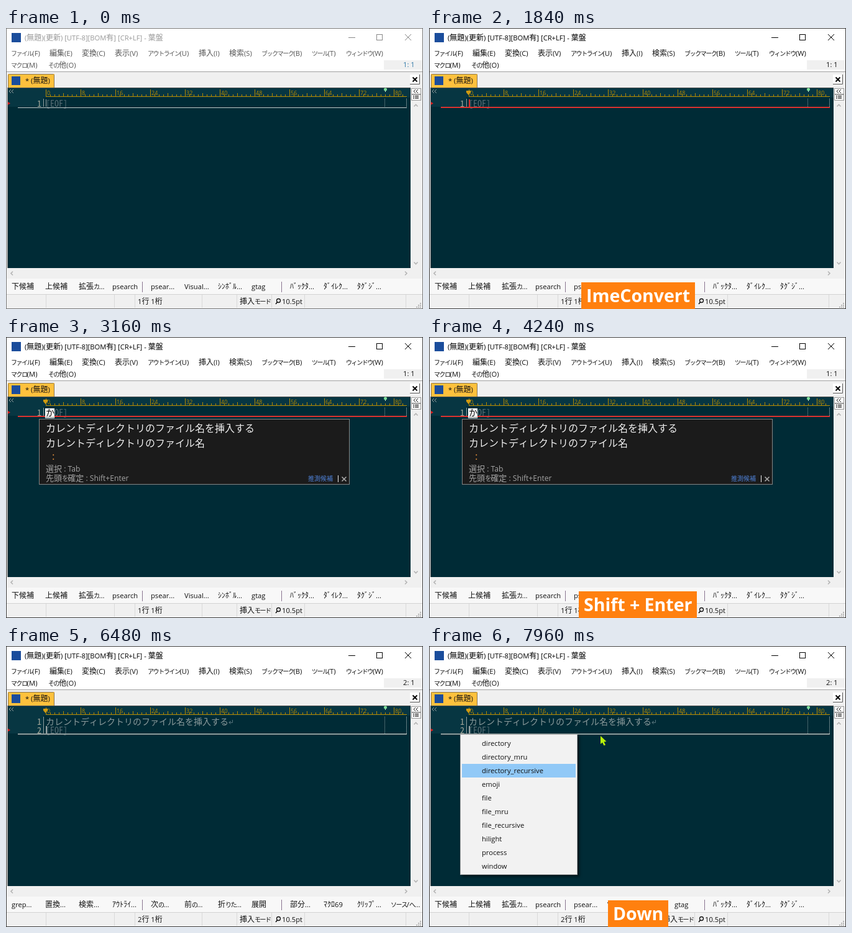
Write an HTML page with a canvas that moves like this. It is 671 px wide and 453 px high and loops after 8 s.

```html
<!DOCTYPE html>
<html lang="ja">
<head>
<meta charset="utf-8">
<title>Editor</title>
<style>
html, body { margin: 0; width: 100%; height: 100%; overflow: hidden; background: #fff; }
canvas { display: block; }
</style>
</head>
<body>
<canvas id="stage" width="671" height="453"></canvas>
<script>
const ctx = document.getElementById('stage').getContext('2d');
const LOOP = 8000;
const UI = '"Open Sans", "Noto Sans CJK JP", "Noto Sans CJK", sans-serif';
const CJK = '"Noto Sans CJK JP", "Noto Sans CJK", sans-serif';
const MONO = '"Noto Sans Mono CJK JP", "Noto Sans CJK JP", "Noto Sans Mono", monospace';
const BASE = '#002b36', PANEL = '#073642', GOLD = '#b58900', RED = '#dc322f';
const CELL = 7, LEFT = 64;

const SENTENCE = 'カレントディレクトリのファイル名を挿入する';
const MENU = [['ファイル(F)', 8], ['編集(E)', 70], ['変換(C)', 122], ['表示(V)', 175],
  ['アウトライン(U)', 228], ['挿入(I)', 310], ['検索(S)', 359], ['ブックマーク(B)', 411],
  ['ツール(T)', 492], ['ウィンドウ(W)', 547]];
const KEYS = ['下候補', '上候補', '拡張カ...', 'psearch', 'psear...', 'Visual...',
  'ｼﾝﾎﾞﾙ...', 'gtag', 'ﾊﾞｯｸﾀ...', 'ﾀﾞｲﾚｸ...', 'ﾀｸﾞｼﾞ...'];
const CTRL_KEYS = ['grep...', '置換...', '検索...', 'ｱｳﾄﾗｲ...', '次の...', '前の...',
  '折りた...', '展開', '部分...', 'ﾏｸﾛ69', 'ｸﾘｯﾌﾟ...', 'ソース/ヘ...'];
const SOURCES = ['directory', 'directory_mru', 'directory_recursive', 'emoji', 'file',
  'file_mru', 'file_recursive', 'hilight', 'process', 'window'];

// [start time, banner text]
const BANNERS = [[0, ''], [1840, 'ImeConvert'], [2240, 'ImeConvert  k'], [2320, 'ImeConvert  k  a'],
  [2720, 'k  a'], [3160, ''], [4240, 'Shift + Enter'], [5120, ''], [5160, 'Enter'],
  [5560, 'Enter  ImeNonConvert'], [6080, 'ImeNonConvert'], [6480, ''],
  [6640, 'Ctrl + P'], [7200, 'Ctrl + P  Down'], [7520, 'Down']];

const within = (t, a, b) => t >= a && t < b;

function box(x, y, w, h, color) {
  ctx.fillStyle = color;
  ctx.fillRect(x, y, w, h);
}

function frame(x, y, w, h, color) {
  ctx.strokeStyle = color;
  ctx.lineWidth = 1;
  ctx.strokeRect(x + .5, y + .5, w - 1, h - 1);
}

function path(points, color, width = 1) {
  ctx.beginPath();
  points.forEach(([x, y], i) => i ? ctx.lineTo(x, y) : ctx.moveTo(x, y));
  ctx.strokeStyle = color;
  ctx.lineWidth = width;
  ctx.stroke();
}

function poly(points, color) {
  ctx.beginPath();
  points.forEach(([x, y]) => ctx.lineTo(x, y));
  ctx.closePath();
  ctx.fillStyle = color;
  ctx.fill();
}

function cross(x, y, r, color, width) {
  path([[x - r, y - r], [x + r, y + r]], color, width);
  path([[x + r, y - r], [x - r, y + r]], color, width);
}

function chevron(x, y, dx, dy, color, width = 1.6) {
  path([[x - dx - dy * 2, y - dy - dx * 2], [x + dx, y + dy], [x - dx + dy * 2, y - dy + dx * 2]], color, width);
}

function text(s, x, y, color, font) {
  ctx.font = font;
  ctx.fillStyle = color;
  ctx.fillText(s, x, y);
}

// Interface text: narrow kana, full kanji, slightly smaller Latin.
function label(s, x, y, color = '#111', size = 12) {
  for (const run of s.match(/[ぁ-ヺー]+|[ -~]+|[^ -~ぁ-ヺー]+/g) || []) {
    const kana = /[ぁ-ヺー]/.test(run), latin = /[ -~]/.test(run);
    ctx.letterSpacing = kana ? -size * .117 + 'px' : '0px';
    text(run, x, y, color, size * (kana ? .833 : latin ? .933 : 1) + 'px ' + (latin ? UI : CJK));
    x += ctx.measureText(run).width;
  }
  ctx.letterSpacing = '0px';
}

// Editor text on a fixed grid.
function cells(s, x, y, color, weight = 400) {
  for (const c of s) {
    text(c, x, y, color, `${weight} 14px ${MONO}`);
    x += c > '~' ? CELL * 2 : CELL;
  }
}

function drawWindow(s) {
  box(0, 0, 671, 453, '#fff');
  box(9, 8, 15, 15, '#1b4d9c');
  label('(無題)(更新) [UTF-8][BOM有] [CR+LF] - 葉盤', 30, 20, s.active ? '#000' : '#999');
  const ink = s.active ? '#000' : '#888';
  box(551, 15, 11, 1, ink);
  frame(596, 10, 10, 10, ink);
  cross(647, 15, 5, ink, 1);
  for (const [name, x] of MENU) label(name, x, 45, s.active ? '#111' : '#555');
  label('マクロ(M)', 8, 64, s.active ? '#111' : '#555');
  label('その他(O)', 68, 64, s.active ? '#111' : '#555');
  box(608, 52, 62, 15, '#f0f0f0');
  label(`${s.row}: ${s.col}`, 639, 63, s.active ? '#111' : '#2f78a8');

  box(1, 70, 669, 382, '#f0f0f0');
  box(1, 70, 669, 1, '#a0a0a0');
  box(3, 74, 75, 22, '#ffc13d');
  path([[3.5, 96], [3.5, 76], [5.5, 74.5], [76, 74.5], [77.5, 76], [77.5, 96]], '#8a7650');
  box(9, 78, 14, 14, '#1b4d9c');
  label('* (無題)', 31, 89);
  box(650, 75, 16, 16, '#fff');
  path([[650, 90.5], [665.5, 90.5], [665.5, 75]], '#555');
  cross(658, 83, 3.5, '#000', 2);

  box(652, 97, 16, 10, '#fff');
  box(652, 107, 16, 10, '#fff');
  frame(652, 97, 16, 10, '#999');
  frame(652, 107, 16, 10, '#999');
  for (const x of [656, 660]) path([[x + 3, 99], [x, 102], [x + 3, 105]], '#222');
  for (const y of [109, 111, 113]) {
    box(655, y, 2, 1, '#222');
    box(658, y, 6, 1, '#222');
  }
  chevron(659.5, 125, 0, -1.5, '#b4b4b4');
  chevron(659.5, 379, 0, 1.5, '#b4b4b4');
  chevron(9.5, 395.5, -1.5, 0, '#b4b4b4');
  chevron(643.5, 395.5, 1.5, 0, '#b4b4b4');

  box(1, 404, 669, 25, '#f8f8f8');
  s.keys.forEach((name, i) => label(name, 9 + i * 54 + (i >> 2) * 8, 421));
  box(219, 409, 1, 17, '#8a7590');
  box(443, 409, 1, 17, '#8a7590');

  box(1, 429, 669, 1, '#d2d2d2');
  for (const x of [64, 174, 207, 315, 371, 427, 480, 643]) box(x, 430, 1, 21, '#d9d9d9');
  label(`${s.row}行 ${s.col}桁`, 212, 445);
  label('挿入モード', 376, 445);
  ctx.beginPath();
  ctx.arc(438.5, 439.5, 3, 0, 7);
  ctx.strokeStyle = '#111';
  ctx.lineWidth = 1.3;
  ctx.stroke();
  path([[436.5, 442], [434, 445]], '#111', 1.6);
  label('10.5pt', 444, 445);
  for (let i = 0; i < 3; i++)
    for (let j = 0; j <= i; j++) box(666 - j * 3, 443 + i * 3, 2, 2, '#b5b5b5');
  frame(0, 0, 671, 453, s.active ? '#3c3c3c' : '#777');
}

function drawRuler(s) {
  box(3, 97, 648, 15, PANEL);
  for (const x of [5, 9]) path([[x + 3, 99], [x, 102], [x + 3, 105]], '#93a1a1');
  for (let i = 0; i <= 82; i++) {
    const x = LEFT + i * CELL, h = i % 8 ? i % 4 ? 3 : 5 : 11;
    box(x, 110 - h, 1, h, GOLD);
    if (i % 8 === 0) text(i, x + 2, 108, GOLD, '9px ' + UI);
  }
  box(LEFT, 110, 581, 1, GOLD);
  if (s.active) {
    const x = LEFT + (s.col - 1) * CELL - .5;
    poly([[x - 3.5, 101], [x + 3.5, 101], [x + 3.5, 104], [x, 108], [x - 3.5, 104]], '#d09a10');
  }
  ctx.beginPath();
  ctx.arc(610.5, 99, 2.5, 0, 7);
  ctx.fillStyle = '#7fe09a';
  ctx.fill();
  box(610, 101, 1, 2, '#d8f5de');
}

function drawEditor(s) {
  box(2, 96, 649, 291, BASE);
  box(2, 96, 649, 1, '#555');
  box(2, 96, 1, 291, '#777');
  drawRuler(s);
  const base = 127 + (s.row - 1) * 14, line = base + (s.active ? 0 : 1);
  box(3, 112, 57, base - 112, PANEL);
  for (let r = 1; r <= s.row; r++) cells(String(r), 50, 113 + r * 14, '#a4a79a');
  box(60, 114, 1, base - 114, '#93a1a1');
  for (let y = 114; y < base; y += 2) {
    box(609, y, 1, 1, '#8a9a9b');
    box(644, y, 1, 1, '#c5cccc');
  }
  poly([[3, base - 8], [7, base - 5.5], [3, base - 3]], '#e02020');

  if (s.typed) cells(SENTENCE, LEFT, 127, '#8b9a9b', 500);
  if (s.row > 1) path([[364.5, 119], [364.5, 123.5], [359, 123.5], [361.5, 121], [359, 123.5], [361.5, 126]], '#53727a');
  const x = LEFT + (s.col - 1) * CELL;
  cells('[EOF]', x, base, '#586e75');
  box(19, line, 626, s.active ? 2 : 1, s.ime ? RED : s.active ? '#8f9b9b' : '#c4c9c9');
  if (!s.compose) box(x, base - 12, s.active ? 2 : 1, 12, s.ime ? RED : '#9aa5a6');

  if (s.compose) {
    box(63, 115, 15, 16, '#fff');
    if (s.caret) box(78, 115, 2, 16, '#fff');
    cells(s.compose, LEFT, 127, '#000');
    for (let i = 64; i < 78; i += 2) box(i, 129, 1, 1, '#000');
  }
}

function drawCandidates() {
  box(53, 132, 500, 106, '#1b1b1b');
  frame(53, 132, 500, 106, '#858585');
  const font = '300 16px ' + CJK;
  text(SENTENCE, 64, 153, '#eee', font);
  text(SENTENCE.slice(0, 16), 64, 177, '#eee', font);
  text(':', 74, 198, '#d98a3a', '16px ' + CJK);
  label('選択 : Tab', 64, 217, '#a5a5a5', 13);
  label('先頭を確定 : Shift+Enter', 64, 232, '#a5a5a5', 13);
  label('推測候補', 486, 232, '#4f82d8', 10);
  box(534, 223, 1, 11, '#eee');
  cross(544, 229, 3.5, '#aaa', 1.6);
}

function drawMenu(selected) {
  ctx.save();
  ctx.shadowColor = 'rgba(0,0,0,.5)';
  ctx.shadowBlur = 4;
  ctx.shadowOffsetX = ctx.shadowOffsetY = 3;
  box(50, 142, 189, 227, '#f2f2f2');
  ctx.restore();
  frame(50, 142, 189, 227, '#a8a8a8');
  if (selected >= 0) box(53, 146 + selected * 22, 183, 22, '#91c9f7');
  SOURCES.forEach((name, i) => label(name, 85, 161 + i * 22));
}

function drawPointer(x, y) {
  const shape = [[0, 0], [0, 13], [3, 10.5], [5.5, 15.5], [8, 14.5], [5.5, 9.5], [9.5, 9]];
  poly(shape.map(([a, b]) => [x + a, y + b]), '#b9f20a');
}

function drawBanner(s) {
  if (!s) return;
  ctx.font = 'bold 28.5px "Open Sans", "Noto Sans", sans-serif';
  const w = ctx.measureText(s).width, x = Math.round(336.5 - w / 2);
  const top = s.includes('Ctrl') ? 406 : 410;
  box(x - 8, top, Math.round(w) + 16, 453 - top, '#ff800f');
  ctx.fillStyle = '#fff';
  ctx.fillText(s, x, 442);
}

function stateAt(t) {
  const typed = t >= 4280, row = t >= 5160 ? 2 : 1;
  return {
    active: t >= 640,
    ime: within(t, 1840, 5560),
    typed, row,
    col: typed && row === 1 ? 43 : 1,
    compose: within(t, 2240, 2320) ? 'ｋ' : within(t, 2320, 4280) ? 'か' : '',
    caret: within(t, 2240, 2800) || within(t, 3360, 3840),
    keys: within(t, 6080, 6640) ? CTRL_KEYS : KEYS,
    selected: t >= 7960 ? 2 : t >= 7840 ? 1 : t >= 7200 ? 0 : -1,
    banner: BANNERS.findLast(([start]) => t >= start)[1]
  };
}

function render(t) {
  const s = stateAt(t);
  drawWindow(s);
  drawEditor(s);
  if (within(t, 2400, 4280)) drawCandidates();
  if (t >= 7120) drawMenu(s.selected);
  if (within(t, 120, 1840) || t >= 7120) {
    const p = t > 1840 ? 1 : Math.min(1, (t - 80) / 680);
    const e = p * p * (3 - 2 * p);
    drawPointer(660 - 384 * e, 445 - 300 * e);
  }
  drawBanner(s.banner);
}

const origin = performance.now();
function tick() {
  const t = (performance.now() - origin) % LOOP;
  render(Math.floor(t / 40) * 40);
  requestAnimationFrame(tick);
}
tick();
</script>
</body>
</html>
```
